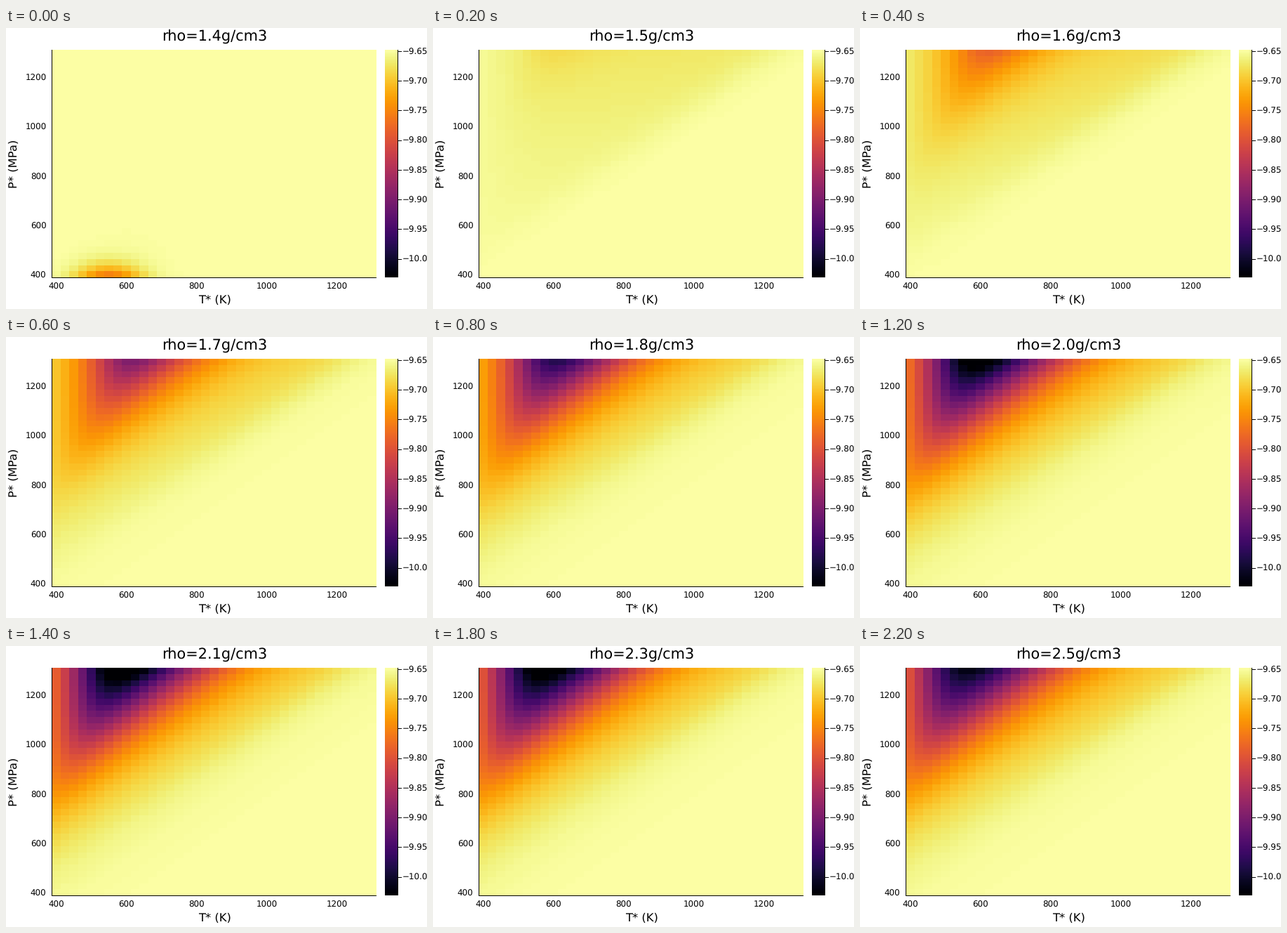
These frames come from a looping animation (600 by 400 pixels, 2400 ms). A matplotlib script:

```python
import numpy as np
import matplotlib.pyplot as plt
from matplotlib.animation import FuncAnimation

plt.rcParams["font.family"] = "DejaVu Sans"
plt.rcParams["text.hinting"] = "none"
W, H, DPI = 600, 400, 100
FRAMES, INTERVAL = 12, 200
PLOT = (65, 528, 355, 31)
BAR = (540, 558, 355, 31)

axis = np.arange(400, 1301, 25)
T, P = np.meshgrid(axis, axis)
Q = P - T


def sigmoid(x):
    return 1 / (1 + np.exp(-x))


def well(rho):
    """Steep slope along the diagonal P - T, closing in as density rises."""
    centre = 640 + 90 * np.exp(-8 * (rho - 1.7))
    height = 1.6 + .35 * max(0, 1 - ((rho - 2) / .5) ** 2)
    return height * sigmoid((Q - centre) / 140)


def shelf(rho):
    """Broad, shallow step above the diagonal."""
    height = .11 * (1 - np.exp(-(rho - 1.4) / .12))
    return height * sigmoid((Q - 80) / 45) * (P / 1300) ** 1.5


def limit(rho):
    """Greatest depth that a temperature allows."""
    return .44 * np.exp(-1.15 * np.exp(-5 * (rho - 1.7)) + (T - 400) / 100)


def spot():
    up = P - 400
    core = .265 * np.exp(-((T - 550) / 92) ** 2 - up / 55 - (up / 90) ** 2)
    haze = .008 * np.exp(-((T - 600) / 130) ** 2 - (up / 200) ** 2)
    return core + haze


def field(rho):
    if rho < 1.45:
        return 1 - spot()
    slope = np.hypot(well(rho), shelf(rho))
    return 1 - 1 / np.hypot(1 / slope, 1 / limit(rho))


fig = plt.figure(figsize=(W / DPI, H / DPI), dpi=DPI, facecolor="white")
ax = fig.add_axes([0, 0, 1, 1])
ax.axis("off")


def label(x, y, text, px, ha="center", va="baseline", **kw):
    return ax.text(x, y, text, fontsize=px * 72 / DPI, color="black", ha=ha, va=va, **kw)


def line(xs, ys):
    ax.plot(xs, ys, color="black", lw=.72, solid_capstyle="butt", snap=False)


def image(data, extent):
    return ax.imshow(data, cmap="inferno", vmin=0, vmax=1, origin="lower",
                     aspect="auto", interpolation="nearest", extent=extent)


heat = image(field(1.4), PLOT)
image(np.linspace(0, 1, 256)[:, None], BAR)
ax.set_xlim(0, W)
ax.set_ylim(H, 0)

line([65.5, 65.5], [31, 356])
line([65, 528], [355.5, 355.5])
line([558.5, 558.5], [31, 355])

for v in range(400, 1201, 200):
    label(72 + (v - 400) / 2, 372, str(v), 11.9)
    label(57.5, 355.8 - (v - 400) * .351, str(v), 11.9, ha="right")

for i in range(8):
    y = 33.3 + 42.25 * i
    line([558, 564], [np.floor(y) + .5] * 2)
    label(565, y + 4.1, f"\u2212{9.65 + .05 * i:.2f}", 11.9, ha="left")

label(297, 392.3, "T* (K)", 16.4)
label(19, 193, "P* (MPa)", 16.4, ha="right", va="center", rotation=90)
title = label(297, 19, "", 20.85)


def update(i):
    rho = 1.4 + i / 10
    heat.set_data(field(rho))
    title.set_text(f"rho={rho:.1f}g/cm3")
    return heat, title


anim = FuncAnimation(fig, update, frames=FRAMES, interval=INTERVAL, repeat=True, repeat_delay=0)
plt.show()
```
